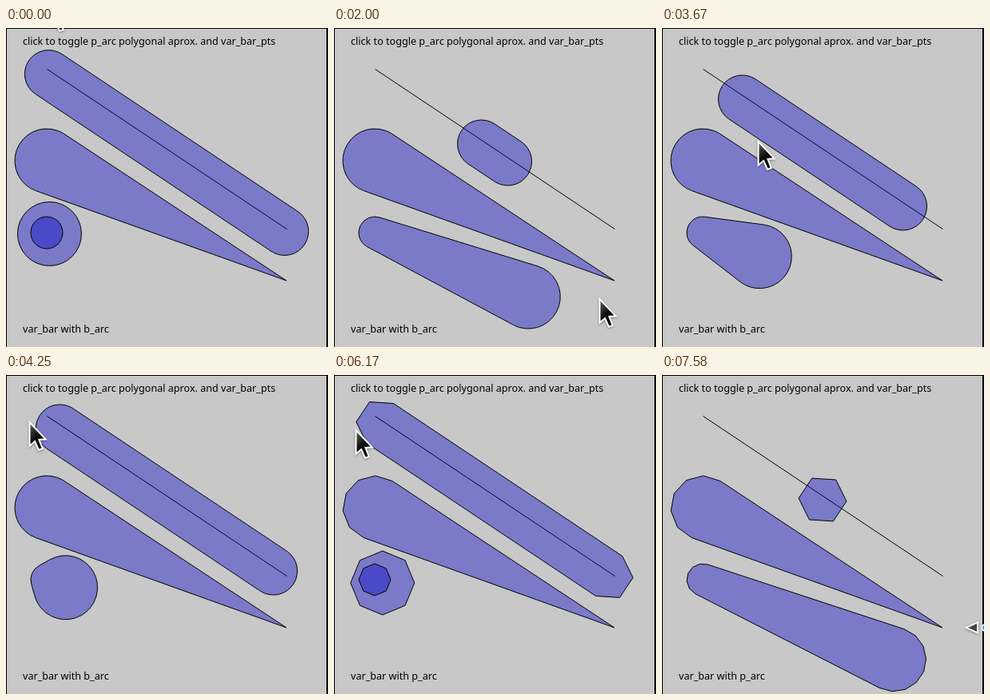
An HTML page with a canvas for the animation above (8000 ms loop, 403 by 399 pixels).

```html
<!DOCTYPE html>
<html lang="en">
<head>
<meta charset="utf-8">
<title>Variable bars</title>
<style>
  html, body { margin: 0; width: 100%; height: 100%; overflow: hidden; background: #c8c8c8; }
  canvas { display: block; }
</style>
</head>
<body>
<canvas width="403" height="399"></canvas>
<script>
const ctx = document.querySelector('canvas').getContext('2d');
const LOOP = 8000, STEP = 1000 / 12, TAU = Math.PI * 2;
const POLY_STEP = 64, EDGE_STEP = 90;

// Pointer moves; amount drives the bars. Gaps between moves are rests.
const start = { x: 55, y: -33, amount: .016 };
const moves = [
  { from: 0, to: 10, x: 10, y: 24, amount: .015 },
  { from: 10, to: 17, x: 172, y: 167, amount: .427 },
  { from: 17, to: 24, x: 332, y: 337, amount: .89 },
  { from: 26, to: 30, x: 385, y: 385, amount: 1 },
  { from: 34, to: 38, x: 327, y: 369, amount: .942 },
  { from: 38, to: 44, x: 120, y: 140, amount: .33 },
  { from: 44, to: 51, x: 29, y: 57, amount: .109 },
  { from: 51, to: 55, x: 4, y: 40, amount: .01 },
  { from: 73, to: 74, x: 27, y: 67, amount: .045 },
  { from: 74, to: 81, x: 208, y: 203, amount: .533 },
  { from: 81, to: 83, x: 300, y: 290, amount: .76 },
  { from: 83, to: 91, x: 404, y: 316, amount: 1.109 }
];

let poly = false;

const mix = (a, b, f) => a + (b - a) * f;

function pointerAt(step) {
  return moves.reduce((p, m) => {
    const f = Math.min(1, Math.max(0, (step - m.from) / (m.to - m.from)));
    return { x: mix(p.x, m.x, f), y: mix(p.y, m.y, f), amount: mix(p.amount, m.amount, f) };
  }, start);
}

function arc(x, y, r, from, to, sides) {
  if (!poly) return ctx.arc(x, y, r, from, to);
  for (let i = 0; i <= sides; i++) {
    const a = mix(from, to, i / sides);
    ctx.lineTo(x + r * Math.cos(a), y + r * Math.sin(a));
  }
}

function shape(trace) {
  ctx.beginPath();
  trace();
  ctx.closePath();
  ctx.fill();
  ctx.stroke();
}

// Two round ends joined by tangents, or two discs when one holds the other
function bar(x0, y0, r0, x1, y1, r1, sides0, sides1) {
  const dx = x1 - x0, dy = y1 - y0, d = Math.hypot(dx, dy);
  if (d <= Math.abs(r0 - r1)) {
    shape(() => arc(x1, y1, r1, 0, TAU, 8));
    shape(() => arc(x0, y0, r0, 0, TAU, 8));
    return;
  }
  const dir = Math.atan2(dy, dx), bend = Math.acos((r0 - r1) / d);
  shape(() => {
    arc(x0, y0, r0, dir + bend, dir + TAU - bend, sides0);
    arc(x1, y1, r1, dir - bend, dir + bend, sides1);
  });
}

function outlined(points, fill) {
  ctx.save();
  ctx.beginPath();
  points.forEach(([x, y]) => ctx.lineTo(x, y));
  ctx.closePath();
  ctx.lineWidth = 4;
  ctx.strokeStyle = '#fff';
  ctx.shadowColor = 'rgba(0,0,0,.4)';
  ctx.shadowBlur = 3;
  ctx.shadowOffsetY = 1;
  ctx.stroke();
  ctx.shadowColor = 'transparent';
  ctx.fillStyle = fill;
  ctx.fill();
  ctx.restore();
}

function arrow(x, y) {
  ctx.save();
  ctx.translate(x - .5, y - .5);
  const shade = ctx.createLinearGradient(0, 8, 14, 26);
  shade.addColorStop(0, '#555');
  shade.addColorStop(.7, '#0c0c0c');
  outlined([[2, 5], [2, 30], [8, 25], [13, 36], [16, 35], [11.5, 23.5], [19, 23]], shade);
  ctx.restore();
}

function edgePointer() {
  outlined([[383, 316], [394, 311], [394, 321]], '#444');
  ctx.beginPath();
  ctx.arc(405, 316, 4.5, 0, TAU);
  ctx.fillStyle = '#1aa3e0';
  ctx.fill();
  ctx.lineWidth = 1.5;
  ctx.strokeStyle = '#fff';
  ctx.stroke();
}

function draw(now) {
  const step = Math.floor((now % LOOP + 4) / STEP);
  const { x, y, amount } = pointerAt(step);
  poly = step >= POLY_STEP;

  ctx.fillStyle = '#c8c8c8';
  ctx.fillRect(0, 0, 403, 399);
  ctx.fillStyle = '#000';
  ctx.fillRect(0, 0, 403, 1);
  ctx.fillRect(0, 0, 1, 399);
  ctx.fillRect(401, 0, 2, 399);
  ctx.font = '12.6px "Noto Sans", sans-serif';
  ctx.fillText('click to toggle p_arc polygonal aprox. and var_bar_pts', 21, 21);
  ctx.fillText(`var_bar with ${poly ? 'p' : 'b'}_arc`, 21, 381);

  ctx.lineWidth = 1;
  ctx.strokeStyle = '#000';
  ctx.fillStyle = 'rgba(0,0,200,.392)';
  ctx.beginPath();
  ctx.moveTo(51.5, 51.5);
  ctx.lineTo(351.5, 251.5);
  ctx.stroke();
  const half = Math.max(.01, 150 * (1 - amount));
  bar(201 - half, 156 - half * 2 / 3, 30, 201 + half, 156 + half * 2 / 3, 30, 3, 3);
  bar(51, 166, 40, 351, 316, 0, 6, 6);
  bar(51, 256, 20, 51 + 216 * amount, 256 + 90 * amount, 40, 6, 8);

  if (step >= EDGE_STEP) edgePointer();
  else arrow(x, y);
}

function tick() {
  draw(performance.now());
  requestAnimationFrame(tick);
}
tick();
</script>
</body>
</html>
```
